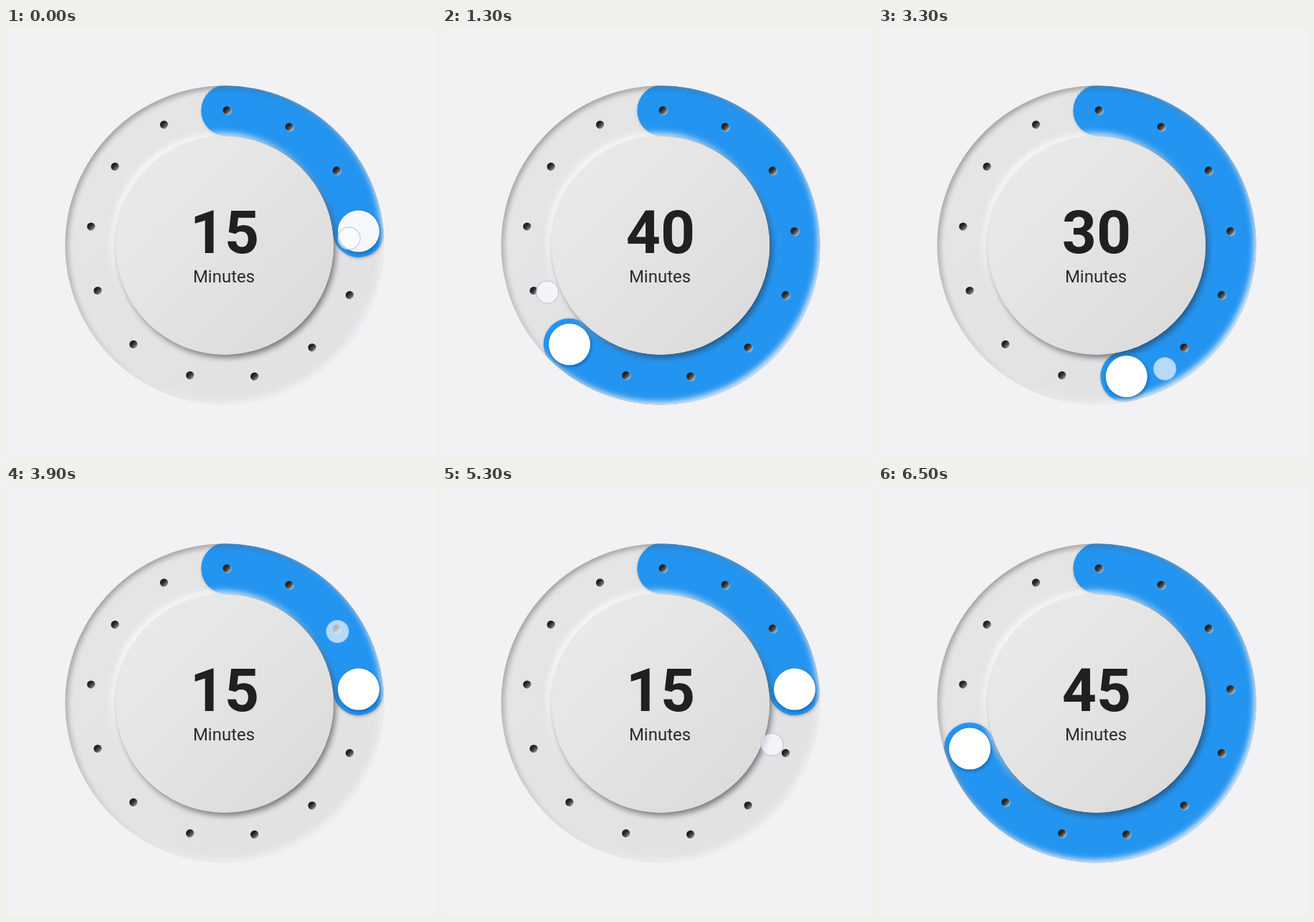
An HTML page with a canvas that plays this animation: 600x600 px, repeating every 6.6 s.

```html
<!DOCTYPE html>
<html lang="en">
<head>
<meta charset="utf-8">
<title>Minute dial</title>
<style>
  html, body { margin: 0; width: 100%; height: 100%; overflow: hidden; background: #f2f1f4; }
  canvas { display: block; width: 600px; height: 600px; }
</style>
</head>
<body>
<canvas id="stage" width="600" height="600"></canvas>
<script>
const ctx = document.getElementById('stage').getContext('2d');
const TAU = Math.PI * 2;
const LOOP = 6600, TICK = 100, LAG = 150;
const CX = 305, CY = 303, OUTER = 222.5, TRACK = 188, DISC = 152;
const STOPS = 13;

// Pointer path: time, position in stops, distance from the centre
const path = [
  [0, 3.1, 174], [100, 3.3, 175], [550, 5.7, 178], [1150, 8.3, 173],
  [1300, 8.9, 171], [1980, 12.1, 176], [2050, 12.1, 175], [2150, 11.7, 168],
  [2300, 10.7, 161], [2650, 8.75, 172], [2800, 7.9, 180], [3300, 5.42, 197],
  [4050, 1.2, 184], [4350, -0.1, 180], [4650, -0.1, 180], [4900, 1.3, 174],
  [5150, 3, 169], [5300, 3.95, 166], [5550, 5.3, 176], [6150, 8.7, 186], [6250, 9, 188]
];

function pointerAt(t) {
  if (t <= 0) return { pos: path[0][1], r: path[0][2] };
  const n = path.findIndex(k => k[0] > t);
  if (n < 0) {
    const end = path[path.length - 1];
    return { pos: end[1], r: end[2] };
  }
  const a = path[n - 1], b = path[n];
  const f = (t - a[0]) / (b[0] - a[0]);
  return { pos: a[1] + (b[1] - a[1]) * f, r: a[2] + (b[2] - a[2]) * f };
}

const angle = pos => (1 + pos * 360 / STOPS - 90) * Math.PI / 180;
const polar = (pos, r) => [CX + Math.cos(angle(pos)) * r, CY + Math.sin(angle(pos)) * r];

function shadow(color, blur, dx, dy) {
  ctx.shadowColor = color;
  ctx.shadowBlur = blur;
  ctx.shadowOffsetX = dx;
  ctx.shadowOffsetY = dy;
}

function noShadow() {
  shadow('transparent', 0, 0, 0);
}

function disc(x, y, r, fill) {
  ctx.beginPath();
  ctx.arc(x, y, r, 0, TAU);
  ctx.fillStyle = fill;
  ctx.fill();
}

function diagonal(x, y, r, ...colors) {
  const g = ctx.createLinearGradient(x - r, y - r, x + r, y + r);
  colors.forEach((c, i) => g.addColorStop(i / (colors.length - 1), c));
  return g;
}

// Shadow cast inwards from the rim of the dial
function inset(color, blur, dx, dy) {
  ctx.save();
  ctx.beginPath();
  ctx.arc(CX, CY, OUTER, 0, TAU);
  ctx.clip();
  shadow(color, blur, dx, dy);
  ctx.beginPath();
  ctx.rect(-100, -100, 800, 800);
  ctx.arc(CX, CY, OUTER + 0.5, 0, TAU, true);
  ctx.fillStyle = '#f2f1f4';
  ctx.fill('evenodd');
  ctx.restore();
}

function drawArc(stop) {
  ctx.save();
  ctx.beginPath();
  ctx.arc(CX, CY, OUTER, 0, TAU);
  ctx.clip();
  shadow('rgba(0,0,0,.3)', 4, 1, 1);
  ctx.beginPath();
  ctx.arc(CX, CY, TRACK, angle(0), angle(stop) + 0.002);
  ctx.lineWidth = 72;
  ctx.lineCap = 'round';
  ctx.strokeStyle = '#2394f0';
  ctx.stroke();
  ctx.restore();
}

function drawHole(stop) {
  const [x, y] = polar(stop, TRACK);
  disc(x + 0.8, y + 0.8, 6, 'rgba(255,250,245,.35)');
  disc(x, y, 5.7, diagonal(x, y, 4.6, '#1d1c1e', '#232224', '#5a5654', '#c9c4c0'));
}

function drawCentre() {
  shadow('rgba(255,255,255,.85)', 10, -5, -5);
  disc(CX, CY + 0.7, DISC, '#e3e3e4');
  shadow('rgba(40,40,44,.6)', 9, 3, 4);
  disc(CX, CY + 0.7, DISC, '#e3e3e4');
  noShadow();
  disc(CX, CY + 0.7, DISC, diagonal(CX, CY, 108, '#e9e9ea', '#e3e3e4', '#dcdcdd'));
}

function drawText(minutes) {
  ctx.textAlign = 'center';
  ctx.textBaseline = 'alphabetic';
  ctx.fillStyle = '#201f22';
  ctx.font = '700 84px Roboto, sans-serif';
  ctx.fillText(minutes, CX, 314);
  ctx.fillStyle = '#2b2a2d';
  ctx.font = '400 24px Roboto, sans-serif';
  ctx.fillText(minutes ? 'Minutes' : 'Minute', 304, 355);
}

function drawKnob(x, y, held) {
  shadow('rgba(0,40,90,.5)', 5, 1, 2);
  disc(x, y, 29, held ? '#f6f7fa' : '#ffffff');
  noShadow();
}

function drawPointer(x, y, alpha) {
  ctx.save();
  ctx.globalAlpha = alpha;
  disc(x, y, 15.5, 'rgba(252,252,255,.68)');
  ctx.lineWidth = 1.5;
  ctx.strokeStyle = 'rgba(178,200,232,.75)';
  ctx.stroke();
  ctx.restore();
}

function draw(t) {
  const pointer = pointerAt(t);
  const target = Math.round(pointerAt(t - LAG).pos);
  const stop = Math.max(0, Math.min(STOPS - 1, target));
  const [kx, ky] = polar(stop, TRACK);
  const [px, py] = polar(pointer.pos, pointer.r);

  ctx.fillStyle = '#f2f1f4';
  ctx.fillRect(0, 0, 600, 600);
  disc(CX, CY, OUTER, diagonal(CX, CY, 158, '#e5e5e6', '#e3e3e5', '#e2e2e4'));
  drawArc(stop);
  inset('rgba(60,60,64,.5)', 9, 3, 3);
  inset('rgba(246,246,249,.95)', 9, -3, -4);
  drawCentre();
  for (let i = 0; i < STOPS; i++) if (i !== stop) drawHole(i);
  drawText(stop * 5);
  drawKnob(kx, ky, t < 6400 && Math.hypot(px - kx, py - ky) < 20);
  const alpha = Math.max(0, Math.min(1, (6500 - t) / 200));
  if (alpha > 0) drawPointer(px, py, alpha);
}

function loop() {
  const t = performance.now() % LOOP;
  draw(Math.floor(t / TICK) * TICK);
  requestAnimationFrame(loop);
}
loop();
</script>
</body>
</html>
```
